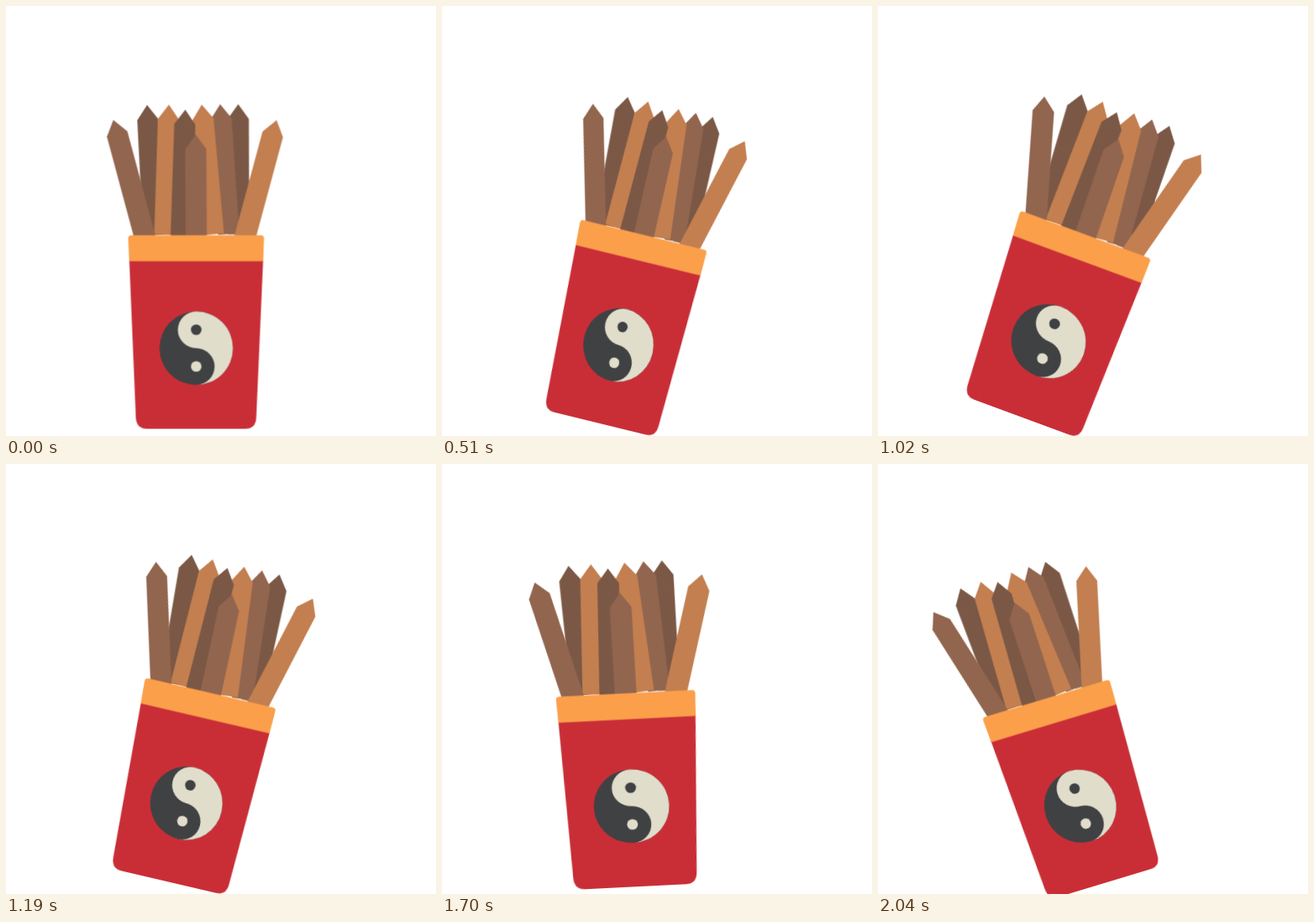
Recreate the animation shown at these times as an HTML page. Size 512 by 512 pixels, loop 2210 ms.

```html
<!DOCTYPE html>
<html lang="en">
<head>
<meta charset="utf-8">
<title>Swaying stick box</title>
<style>
  html, body { margin: 0; width: 100%; height: 100%; overflow: hidden; background: #fff; }
  svg { display: block; width: 100%; height: 100%; }
  #box { transform-box: view-box; transform-origin: 0 0; }
  .dark { fill: #7b5845; }
  .mid { fill: #92654e; }
  .light { fill: #c37f50; }
  .ink { fill: #404143; }
  .cream { fill: #e1ddcb; }
</style>
</head>
<body>
<svg viewBox="0 0 512 512">
  <!-- Drawn around the centre of the emblem -->
  <g id="box">
    <g id="sticks" transform="translate(-226.5 -407.5)"></g>
    <path fill="#c92e37" d="M-79.7-105H79.7L71.5 82.5Q70.9 96 58.5 96H-58.5Q-71.2 96-71.9 82.5Z"/>
    <path fill="#fb9f4b" d="M-77-134.5H77Q80.8-134.5 80.7-130.5L79.8-103.5H-79.8L-81-130.5Q-81.1-134.5-77-134.5Z"/>
    <circle class="ink" r="43.7"/>
    <path class="cream" d="M0-43.7A43.7 43.7 0 0 1 0 43.7A21.85 21.85 0 0 0 0 0A21.85 21.85 0 0 1 0-43.7Z"/>
    <circle class="ink" cy="-22" r="6.3"/>
    <circle class="cream" cy="21.8" r="6.3"/>
  </g>
</svg>
<script>
  const STEP = 170;
  const FOOT_Y = 275;
  const RAD = Math.PI / 180;

  // Every stick has the same outline, hung from its tip; back to front
  const OUTLINE = '0,0 12.6,17.5 12.6,155 -12.6,155 -12.6,17.5';
  const sticks = [
    { tone: 'dark', tip: [168, 118], foot: 176 },
    { tone: 'dark', tip: [276.5, 117], foot: 277 },
    { tone: 'mid', tip: [255, 117], foot: 265.5 },
    { tone: 'light', tip: [233, 117.5], foot: 247.3 },
    { tone: 'light', tip: [194, 117.5], foot: 189 },
    { tone: 'dark', tip: [213.5, 123.5], foot: 208.6 },
    { tone: 'mid', tip: [127.8, 135.7], foot: 165.3 },
    { tone: 'light', tip: [322.2, 136], foot: 284.7 },
    { tone: 'mid', tip: [225.8, 153], foot: 226.5 }
  ];

  const holder = document.getElementById('sticks');
  for (const { tone, tip: [x, y], foot } of sticks) {
    const el = document.createElementNS('http://www.w3.org/2000/svg', 'polygon');
    const angle = Math.atan2(x - foot, FOOT_Y - y) / RAD;
    el.setAttribute('class', tone);
    el.setAttribute('points', OUTLINE);
    el.setAttribute('transform', `translate(${x} ${y}) rotate(${angle})`);
    holder.append(el);
  }

  // One beat each: lean in degrees, relative width, x of the emblem
  const beats = [
    [0, 1, 226.5], [5.7, .96, 221.8], [12.1, .948, 208.1], [13.1, .958, 210],
    [11.9, .971, 212.7], [12.5, .987, 214.7], [19.3, 1.023, 203], [12.5, .987, 214.7],
    [3.85, .938, 223.7], [.75, .98, 225.3], [-3, 1.026, 225.7], [-11.3, 1.017, 234.7],
    [-17.7, .976, 240.8]
  ];

  // Leaning skews the base slightly; leaning right also lifts the box
  function pose([lean, width, x]) {
    const side = lean * RAD;
    const base = (lean + .05 * Math.abs(lean)) * RAD;
    const y = 407.4 - .022 * Math.max(0, lean) ** 2;
    const m = [width * Math.cos(base), width * Math.sin(base), -Math.sin(side), Math.cos(side), x, y];
    return `matrix(${m.map(v => v.toFixed(4))})`;
  }

  const frames = [...beats, beats[0]].map((beat, i) => ({
    transform: pose(beat),
    offset: i / beats.length,
    easing: 'steps(1, end)'
  }));
  document.getElementById('box').animate(frames, {
    duration: STEP * beats.length,
    iterations: Infinity
  });
</script>
</body>
</html>
```
